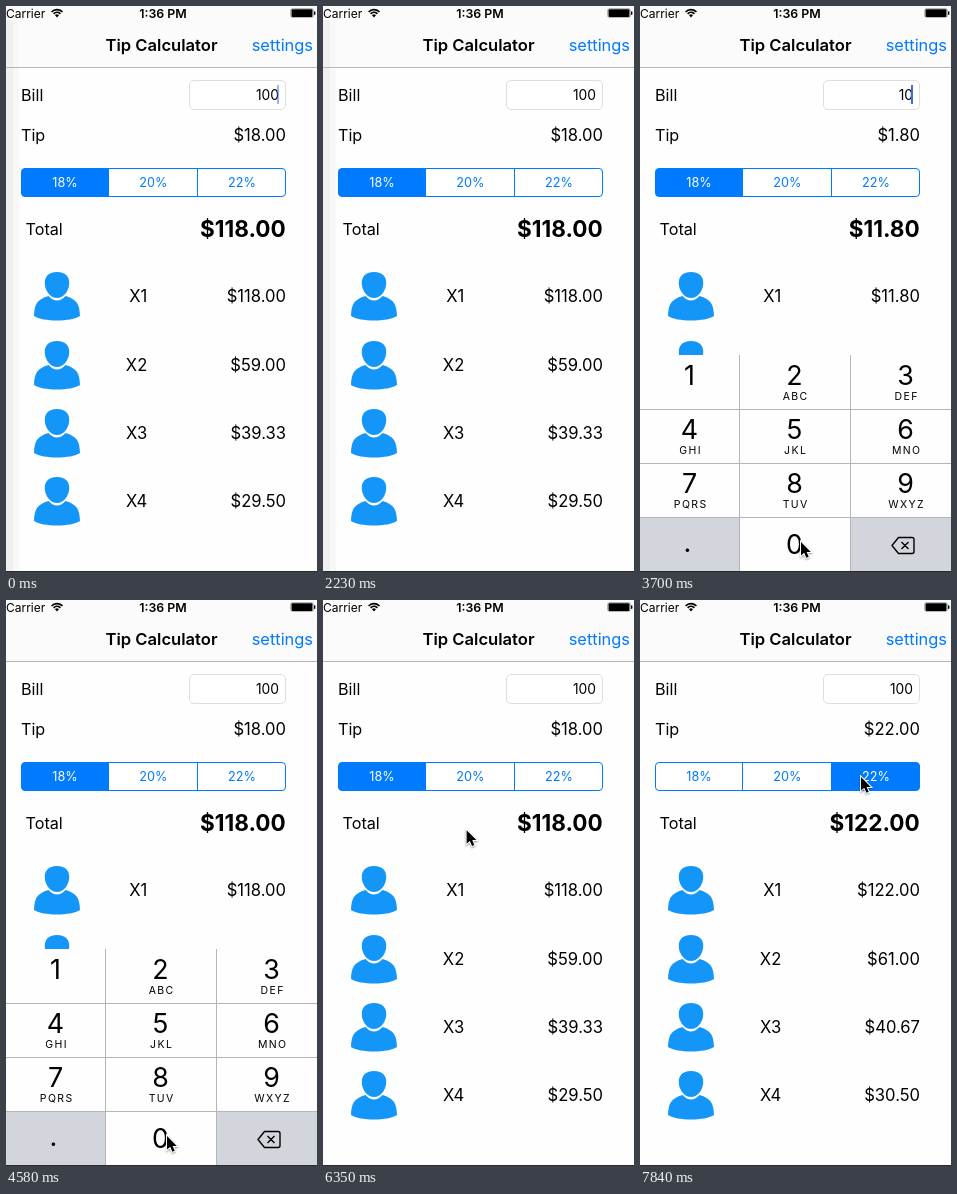
Write an HTML page with a canvas that moves like this. It is 311x566 px and loops after 8000 ms.

```html
<!DOCTYPE html>
<html lang="en">
<head>
<meta charset="utf-8">
<title>Tip Calculator</title>
<style>
  html, body { margin: 0; width: 100%; height: 100%; overflow: hidden; background: #fff; }
  canvas { display: block; width: 311px; height: 566px; }
</style>
</head>
<body>
<canvas id="stage"></canvas>
<script>
const W = 311, H = 566, LOOP = 8000, STEP = 148;
const BLUE = '#007aff', PERSON = '#1496f9', INK = '#000', KEY_GRAY = '#d2d5db';
const LABEL = 16.2, AMOUNT = 16.6;
const canvas = document.getElementById('stage');
const ctx = canvas.getContext('2d');
const ratio = window.devicePixelRatio || 1;
canvas.width = W * ratio;
canvas.height = H * ratio;

const body = new Path2D('M28 310C28.5 298 31 293.5 42.5 290Q51 299 59.5 290C71 293.5 73.5 298 74 310C65 316 37 316 28 310Z');
const head = new Path2D('M51 266C60 266 63.7 271 63.2 278C62.6 286 57 292 51 292C45 292 39.4 286 38.8 278C38.3 271 42 266 51 266Z');
const arrow = new Path2D('M0 0V13.6L3.2 10.8L5.4 15.8L7.7 14.8L5.6 9.9H9.8Z');
const eraser = new Path2D('M252 539.5L258.5 531.5H272Q274 531.5 274 533.5V545.5Q274 547.5 272 547.5H258.5ZM261.5 536L268.5 543M268.5 536L261.5 543');

// [time, x, y] of the pointer tip
const POINTER = [
  [2300, 57, 383], [2900, 57, 383], [3350, 161, 536], [4850, 161, 536],
  [5450, 146, 442], [5650, 146, 442], [6450, 143, 175], [6820, 143, 175],
  [6950, 210, 178], [7250, 221, 177]
];

const clamp = v => Math.max(0, Math.min(1, v));
const ramp = (t, from, to) => clamp((t - from) / (to - from));
const ease = p => p * p * (3 - 2 * p);
const between = (t, from, to) => t >= from && t < to;
const money = v => '$' + v.toFixed(2);

function rect(x, y, w, h, color) {
  ctx.fillStyle = color;
  ctx.fillRect(x, y, w, h);
}

function text(str, x, y, size, { align = 'left', color = INK, weight = 400, spacing = 0 } = {}) {
  ctx.font = `${weight} ${size}px Inter, "Liberation Sans", sans-serif`;
  ctx.letterSpacing = spacing + 'px';
  ctx.textAlign = align;
  ctx.fillStyle = color;
  ctx.fillText(str, x, y);
}

function roundRect(x, y, w, h, r) {
  ctx.beginPath();
  ctx.roundRect(x, y, w, h, r);
}

function billAt(t) {
  if (t < 2300) return '100';
  if (t < 2740) return '';
  if (t < 3480) return '1';
  return t < 3900 ? '10' : '100';
}

function caretAlpha(t) {
  if (t > 5000) return 0;
  if (between(t, 2300, 3900)) return 1;
  const phase = t < 2300 ? t : t - 3150;
  const distance = Math.abs((phase + 810) % 1050 - 525);
  return clamp((365 - distance) / 160);
}

function peopleAlpha(t) {
  return t < 2740 ? 1 - ramp(t, 2300, 2450) : ramp(t, 2730, 3110);
}

function keyboardRise(t) {
  return ease(ramp(t, 2270, 2500)) * (1 - ease(ramp(t, 4980, 5330)));
}

function pointerAt(t) {
  const next = POINTER.findIndex(p => p[0] > t);
  if (next < 0) return POINTER[POINTER.length - 1].slice(1);
  const [t0, x0, y0] = POINTER[next - 1], [t1, x1, y1] = POINTER[next];
  const p = ease(ramp(t, t0, t1));
  return [x0 + (x1 - x0) * p, y0 + (y1 - y0) * p];
}

function drawBattery() {
  roundRect(284.5, 2.5, 23, 9, 2);
  ctx.strokeStyle = '#8a8a8a';
  ctx.lineWidth = 0.6;
  ctx.stroke();
  ctx.fillStyle = INK;
  roundRect(285.5, 3.2, 21, 7.8, 1);
  ctx.fill();
  roundRect(308, 5.2, 1.4, 3.8, 0.7);
  ctx.fill();
}

function drawWifi() {
  ctx.strokeStyle = ctx.fillStyle = INK;
  ctx.lineWidth = 1.6;
  for (const r of [4.6, 7.4]) {
    ctx.beginPath();
    ctx.arc(51, 11, r, -Math.PI * 0.76, -Math.PI * 0.24);
    ctx.stroke();
  }
  ctx.beginPath();
  ctx.moveTo(51, 11.5);
  ctx.arc(51, 11, 2.6, -Math.PI * 0.78, -Math.PI * 0.22);
  ctx.fill();
}

function drawBars() {
  text('Carrier', 0, 11.5, 12);
  text('1:36 PM', 157, 11.5, 12.4, { align: 'center', weight: 600 });
  drawWifi();
  drawBattery();
  text('Tip Calculator', 155.5, 45, 16.6, { align: 'center', weight: 600 });
  text('settings', 307, 45, 16.4, { align: 'right', color: BLUE });
  rect(0, 61, W, 1, '#b6b6b8');
}

function drawSegments(rate, pressed) {
  const edges = [15, 102, 191, 280];
  ctx.save();
  roundRect(15.5, 162.5, 264, 28, 3.5);
  ctx.clip();
  [18, 20, 22].forEach((value, i) => {
    const fill = value === rate ? BLUE : value === pressed ? '#d9ebff' : '#fff';
    rect(edges[i], 162, edges[i + 1] - edges[i], 29, fill);
    if (i) rect(edges[i], 162, 1, 29, BLUE);
    text(value + '%', [59, 147.3, 236][i], 181.2, 12.7,
      { align: 'center', color: value === rate ? '#fff' : BLUE });
  });
  ctx.restore();
  roundRect(15.5, 162.5, 264, 28, 3.5);
  ctx.strokeStyle = BLUE;
  ctx.lineWidth = 1;
  ctx.stroke();
}

function drawForm(t, bill, rate) {
  const tip = bill * rate / 100, total = +bill + tip;
  text('Bill', 15, 95, LABEL);
  text('Tip', 15, 134.5, LABEL);
  text('Total', 19.5, 228.5, LABEL);
  roundRect(183.5, 74.5, 96, 29, 4.5);
  ctx.fillStyle = '#fff';
  ctx.fill();
  ctx.strokeStyle = '#dedede';
  ctx.lineWidth = 1;
  ctx.stroke();
  text(bill, 273, 94, 13.8, { align: 'right' });
  ctx.globalAlpha = caretAlpha(t);
  rect(271, 79, 2, 19, '#4268ee');
  ctx.globalAlpha = 1;
  text(money(tip), 280, 134.5, AMOUNT, { align: 'right' });
  drawSegments(rate, between(t, 6480, 6600) ? 20 : between(t, 7500, 7640) ? 22 : 0);
  text(money(total), 279.8, 231, 22.6, { align: 'right', weight: 700 });

  ctx.globalAlpha = peopleAlpha(t);
  [0, 69, 137, 205].forEach((dy, i) => {
    ctx.save();
    ctx.translate(0, dy);
    ctx.fillStyle = PERSON;
    ctx.fill(body);
    ctx.fill(head);
    text('X' + (i + 1), 141.3, 296, AMOUNT, { align: 'right' });
    text(money(total / (i + 1)), 280, 296, AMOUNT, { align: 'right' });
    ctx.restore();
  });
  ctx.globalAlpha = 1;
}

function drawKeyboard(t) {
  const rise = keyboardRise(t);
  if (!rise) return;
  const columns = [0, 100, 211, W], centers = [49.5, 154.5, 265.5];
  const letters = ['', 'ABC', 'DEF', 'GHI', 'JKL', 'MNO', 'PQRS', 'TUV', 'WXYZ'];
  const pressed = between(t, 2600, 2740) ? 0
    : between(t, 3340, 3480) || between(t, 3780, 3900) ? 10 : -1;
  ctx.save();
  ctx.translate(0, (1 - rise) * 217);
  for (let i = 0; i < 12; i++) {
    const col = i % 3, y = 349 + 54 * Math.floor(i / 3), x = columns[col];
    const gray = i === 9 || i === 11 || i === pressed;
    rect(x, y, columns[col + 1] - x, 54, gray ? KEY_GRAY : '#fefefe');
    if (i < 9) {
      text(String(i + 1), centers[col], y + 30, 26.8, { align: 'center' });
      text(letters[i], centers[col] + 1.2, y + 45, 10.5, { align: 'center', spacing: 1.4 });
    }
  }
  text('.', 47.5, 546, 27, { align: 'center' });
  text('0', 154.5, 548, 26.8, { align: 'center' });
  for (const y of [403, 457, 511]) rect(0, y, W, 1, '#b4b5b8');
  for (const x of [99, 210]) rect(x, 349, 1, 216, '#b4b5b8');
  ctx.strokeStyle = INK;
  ctx.lineWidth = 1.4;
  ctx.lineJoin = 'round';
  ctx.stroke(eraser);
  ctx.restore();
}

function drawPointer(t) {
  if (t < POINTER[0][0]) return;
  ctx.save();
  ctx.translate(...pointerAt(t));
  ctx.shadowColor = 'rgba(0,0,0,.4)';
  ctx.shadowBlur = 2 * ratio;
  ctx.shadowOffsetY = ratio;
  ctx.strokeStyle = '#fff';
  ctx.lineWidth = 2;
  ctx.stroke(arrow);
  ctx.shadowColor = 'transparent';
  ctx.fillStyle = INK;
  ctx.fill(arrow);
  ctx.restore();
}

function draw(t) {
  ctx.setTransform(ratio, 0, 0, ratio, 0, 0);
  rect(0, 0, W, H, '#fefefe');
  rect(0, 0, W, 61, '#fbfbfb');
  if (t < 2300) {
    rect(0, 14, 7, H - 14, '#f0f0f0');
    rect(7, 14, 6, H - 14, '#f8f8f8');
  }
  drawBars();
  drawForm(t, billAt(t), t < 6600 ? 18 : t < 7640 ? 20 : 22);
  drawKeyboard(t);
  rect(0, 565, W, 1, '#2a2a2a');
  drawPointer(t);
}

function tick() {
  const t = performance.now() % LOOP;
  draw(Math.floor((t + 4) / STEP) * STEP);
  requestAnimationFrame(tick);
}
tick();
</script>
</body>
</html>
```
